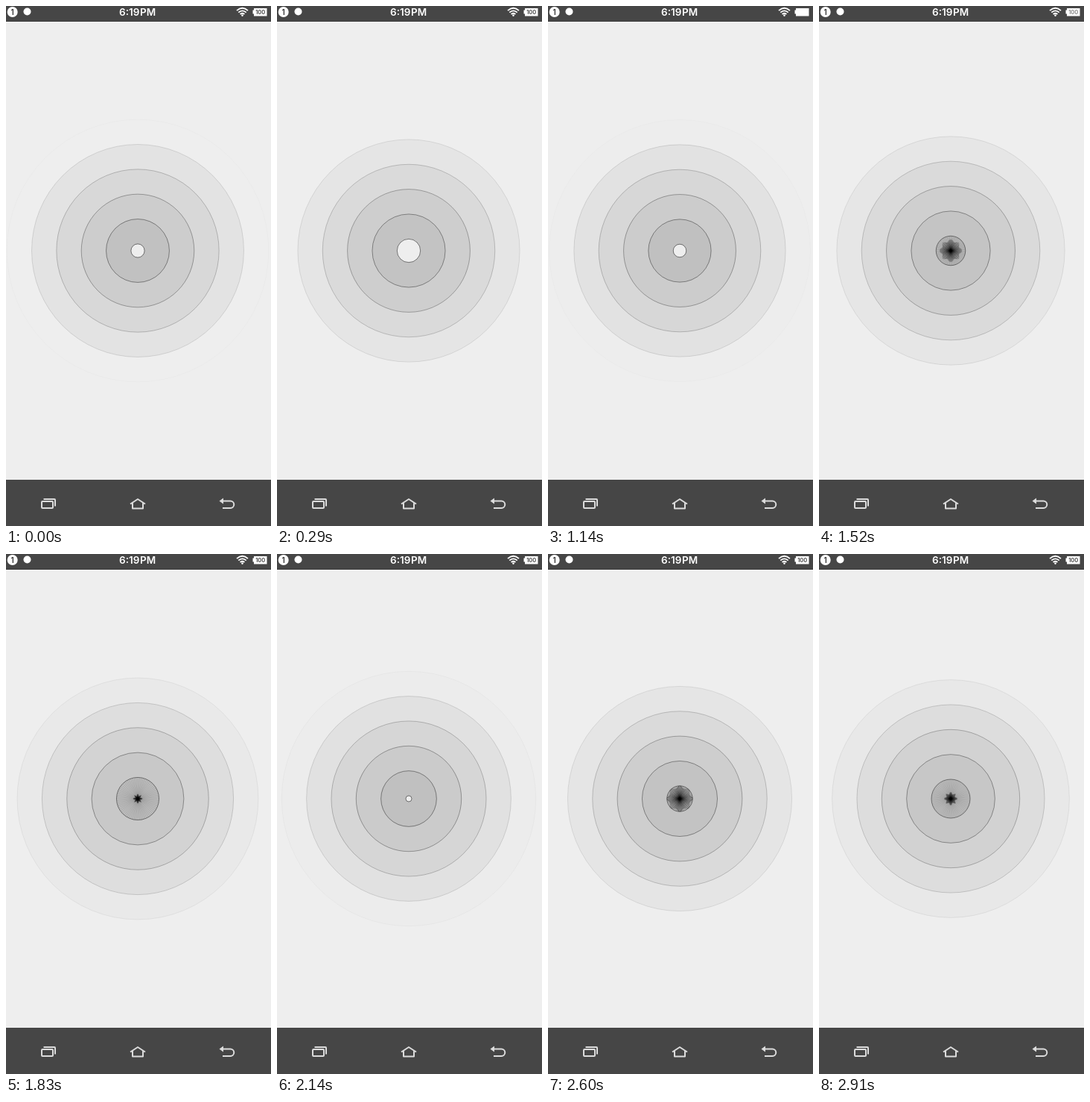
An HTML page with a canvas that plays this animation: 356 by 697 pixels, repeating every 2980 ms.

```html
<!DOCTYPE html>
<html lang="en">
<head>
<meta charset="utf-8">
<title>Ripple</title>
<style>
  html, body { margin: 0; width: 100%; height: 100%; overflow: hidden; background: #eee; }
  canvas, svg { position: absolute; left: 0; top: 0; width: 356px; height: 697px; }
  text { font-family: Inter, "Liberation Sans", sans-serif; font-weight: 600; }
  .icon { fill: none; stroke: #dcdcdc; stroke-width: 2; stroke-linejoin: round; }
  .icon .head { fill: #dcdcdc; stroke: none; }
  .wifi { fill: none; stroke: #fff; stroke-width: 1.8; }
  .charge { animation: charge 2980ms linear infinite; }
  @keyframes charge {
    0%, 23% { opacity: 1; }
    33%, 43.5% { opacity: 0; }
    55%, 100% { opacity: 1; }
  }
</style>
</head>
<body>
<canvas width="356" height="697"></canvas>
<svg viewBox="0 0 356 697">
  <rect width="356" height="21" fill="#464646"/>
  <rect y="20" width="356" height="1" fill="#393939"/>
  <rect y="635" width="356" height="62" fill="#464646"/>

  <circle cx="8.7" cy="8" r="7" fill="#fff"/>
  <text x="8.5" y="11.5" font-size="10" text-anchor="middle" fill="#333">1</text>
  <circle cx="28.5" cy="7.5" r="5" fill="#fff"/>
  <g font-size="13.5" fill="#fff">
    <text x="152" y="13">6:19</text>
    <text x="180" y="13">PM</text>
  </g>
  <g class="wifi">
    <path d="M310 6.2Q317.5 -.6 325 6.2"/>
    <path d="M312.3 8.7Q317.5 4 322.7 8.7"/>
    <path d="M314.6 11Q317.5 8.4 320.4 11"/>
  </g>
  <circle cx="317.5" cy="12.6" r="1.3" fill="#fff"/>
  <path d="M333 3H350.5V13.5H333V10.5H331.5V5.5H333Z" fill="#fff"/>
  <text class="charge" x="341.7" y="11" font-size="7.5" text-anchor="middle" fill="#444">100</text>

  <g class="icon">
    <rect x="48" y="664" width="15" height="9" rx="1"/>
    <path d="M50.5 661H65Q66 661 66 662V670.5"/>
    <path d="M167 667.5L177 661L187 667.5M170 666V673.5H184V666"/>
    <path d="M290 663.5H301.5A4.75 4.75 0 0 1 301.5 673H291"/>
    <path class="head" d="M286.5 663.5L292 659.5V667.5Z"/>
  </g>
</svg>
<script>
  const ctx = document.querySelector("canvas").getContext("2d");
  const LOOP = 2980, STEP = 76.6, LAST_STEP = 38;
  const START_RADIUS = 9.1, GROWTH = 2.2;
  const GAP = 33.35, MAX_RADIUS = 177;
  const SPOKES = 72;

  const black = alpha => `rgba(0,0,0,${alpha})`;

  function circle(radius) {
    ctx.beginPath();
    ctx.arc(0, 0, radius, 0, Math.PI * 2);
  }

  function outline(radius, width, alpha) {
    circle(radius);
    ctx.lineWidth = width;
    ctx.strokeStyle = black(alpha);
    ctx.stroke();
  }

  function spokes(alpha, lengthAt) {
    ctx.lineWidth = 1;
    ctx.strokeStyle = black(alpha);
    for (let i = 0; i < SPOKES; i++) {
      const angle = i / SPOKES * Math.PI * 2;
      const length = lengthAt(angle);
      ctx.beginPath();
      ctx.moveTo(0, 0);
      ctx.lineTo(Math.cos(angle) * length, Math.sin(angle) * length);
      ctx.stroke();
    }
  }

  // A band too wide for its radius folds over the centre into a dark star.
  function foldedBand(radius, alpha) {
    circle(radius);
    ctx.fillStyle = black(alpha);
    ctx.fill();
    spokes(0.1, () => radius);
    spokes(0.36, angle => Math.max(0, GAP - radius + 1.5 * Math.cos(8 * angle)));
  }

  function ring(radius) {
    const strength = 1 - radius / MAX_RADIUS;
    if (radius >= GAP) outline(radius - GAP / 2, GAP, 0.25 * strength);
    else if (radius > GAP / 2) foldedBand(radius, 0.25 * strength);
    outline(radius, 1, 0.015 + 0.5 * strength);
  }

  function draw() {
    const time = performance.now() % LOOP;
    const step = Math.min(LAST_STEP, Math.floor((time + 14) / STEP));

    ctx.setTransform(1, 0, 0, 1, 0, 0);
    ctx.fillStyle = "#eee";
    ctx.fillRect(0, 0, 356, 697);
    ctx.translate(177, 328);
    for (let r = (START_RADIUS + GROWTH * step) % GAP; r < MAX_RADIUS; r += GAP) ring(r);
    requestAnimationFrame(draw);
  }
  draw();
</script>
</body>
</html>
```
